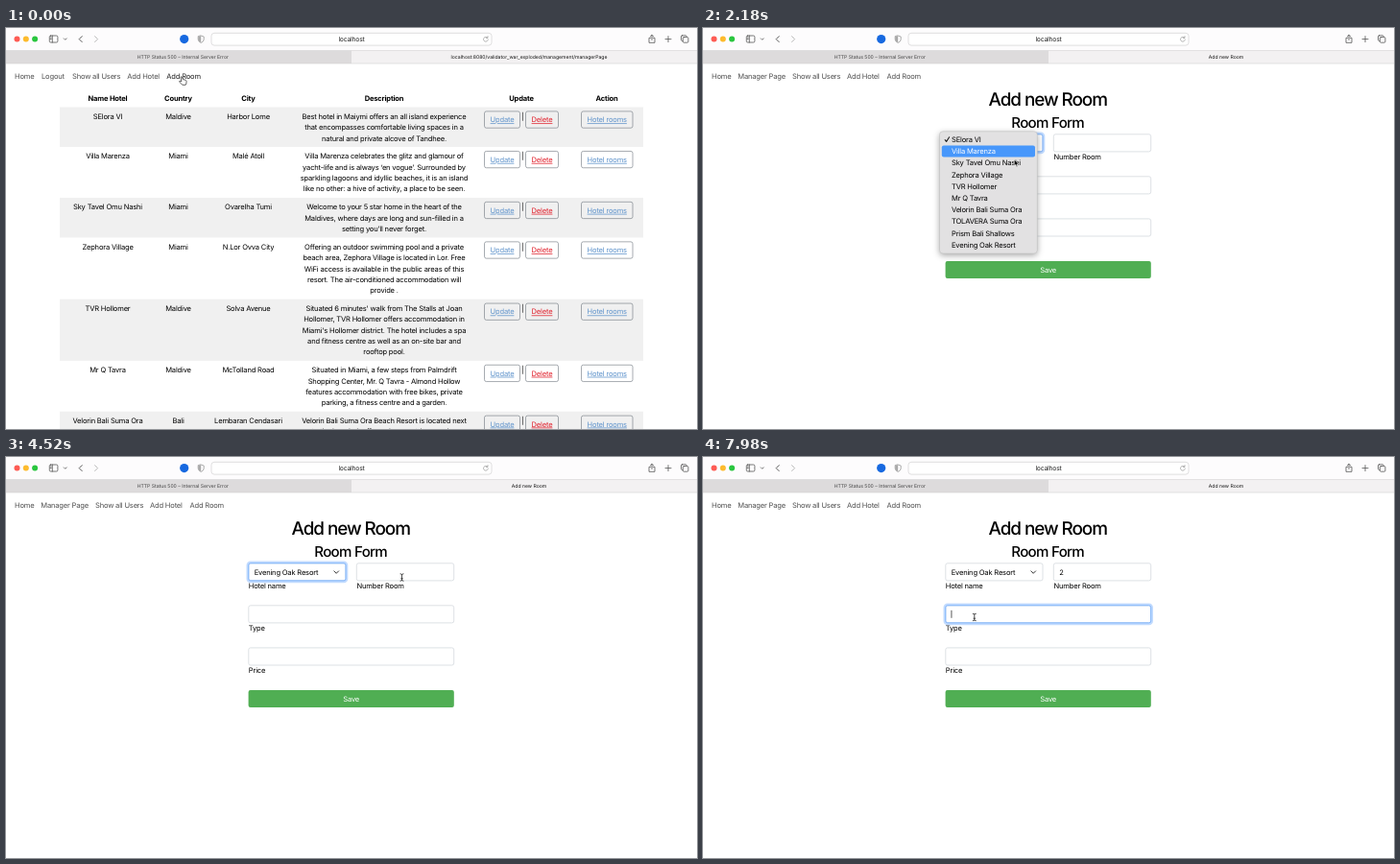
An HTML page for the animation above (8000 ms loop, 720x418 px).

```html
<!DOCTYPE html>
<html lang="en">
<head>
<meta charset="utf-8">
<title>Add new Room</title>
<style>
html, body { margin: 0; width: 100%; height: 100%; overflow: hidden; background: #fff; }
svg { display: block; width: 720px; height: 418px; }
text { font: 7.55px Inter, "Open Sans", sans-serif; letter-spacing: -.18px; fill: #000; text-rendering: geometricPrecision; white-space: pre; }
.mid { text-anchor: middle; }
.nav { fill: #505050; }
.hot { fill: #222; }
.addr { font-size: 6.8px; letter-spacing: -.2px; fill: #222; }
.tab { font-size: 5.1px; letter-spacing: 0; fill: #444; }
.url { fill: #111; }
.head { font-weight: 700; }
.h1 { font-size: 18.9px; font-weight: 500; letter-spacing: -1.05px; }
.h2 { font-size: 15.1px; font-weight: 500; letter-spacing: -.72px; }
.blue { fill: #5f93cb; text-decoration: underline; }
.red { fill: #e0202c; text-decoration: underline; }
.white { fill: #fff; }
.line { fill: none; stroke: #555; stroke-width: .8; stroke-linecap: round; stroke-linejoin: round; }
.btn { fill: none; stroke: #6c757d; stroke-width: .6; }
.field { fill: #fff; stroke: #ced4da; stroke-width: .7; }
.ring { fill: none; stroke: #c2dbfe; stroke-width: 2.6; }
.edge { fill: none; stroke: #79b0fb; stroke-width: .9; }
#menu { filter: drop-shadow(0 2px 3px #0005); }
</style>
</head>
<body>
<svg id="stage" viewBox="0 0 720 418"></svg>
<script>
const hotels = [
  ["SElora VI", "Maldive", "Harbor Lome", [
    "Best hotel in Maiymi offers an all island experience",
    "that encompasses comfortable living spaces in a",
    "natural and private alcove of Tandhee."]],
  ["Villa Marenza", "Miami", "Malé Atoll", [
    "Villa Marenza celebrates the glitz and glamour of",
    "yacht-life and is always ‘en vogue’. Surrounded by",
    "sparkling lagoons and idyllic beaches, it is an island",
    "like no other: a hive of activity, a place to be seen."]],
  ["Sky Tavel Omu Nashi", "Miami", "Ovarelha Tumi", [
    "Welcome to your 5 star home in the heart of the",
    "Maldives, where days are long and sun-filled in a",
    "setting you’ll never forget."]],
  ["Zephora Village", "Miami", "N.Lor Ovva City", [
    "Offering an outdoor swimming pool and a private",
    "beach area, Zephora Village is located in Lor. Free",
    "WiFi access is available in the public areas of this",
    "resort. The air-conditioned accommodation will",
    "provide ."]],
  ["TVR Hollomer", "Maldive", "Solva Avenue", [
    "Situated 6 minutes' walk from The Stalls at Joan",
    "Hollomer, TVR Hollomer offers accommodation in",
    "Miami's Hollomer district. The hotel includes a spa",
    "and fitness centre as well as an on-site bar and",
    "rooftop pool."]],
  ["Mr Q Tavra", "Maldive", "McTolland Road", [
    "Situated in Miami, a few steps from Palmdrift",
    "Shopping Center, Mr. Q Tavra - Almond Hollow",
    "features accommodation with free bikes, private",
    "parking, a fitness centre and a garden."]],
  ["Velorin Bali Suma Ora", "Bali", "Lembaran Cendasari", [
    "Velorin Bali Suma Ora Beach Resort is located next",
    "to the beach. It offers a large outdoor pool, a"]]
];
const names = [...hotels.map(h => h[0]), "TOLAVERA Suma Ora", "Prism Bali Shallows", "Evening Oak Resort"];

// y is the vertical middle of the lowercase line
const text = (x, y, s, cls = "") => `<text x="${x}" y="${y + 2.6}" class="${cls}">${s}</text>`;
const mid = (x, y, s, cls = "") => text(x, y, s, "mid " + cls);
const rect = (x, y, w, h, attrs) => `<rect x="${x}" y="${y}" width="${w}" height="${h}" ${attrs}/>`;
const dot = (x, y, r, fill) => `<circle cx="${x}" cy="${y}" r="${r}" fill="${fill}"/>`;
const line = (d, attrs = "") => `<path class="line" d="${d}" ${attrs}/>`;
const group = (id, body) => `<g id="${id}">${body}</g>`;
const nav = items => items.map(([x, s, cls]) => text(x, 50, s, "nav " + (cls || ""))).join("");

function chrome() {
  return rect(0, 0, 720, 24, 'fill="#fdfcfd"')
    + rect(0, 23.5, 360, 13.5, 'fill="#dddbdc"') + rect(360, 23.5, 360, 13.5, 'fill="#f3f1f2"')
    + rect(0, 23, 720, .6, 'fill="#d6d4d5"') + rect(0, 36.7, 720, .6, 'fill="#d2d0d1"')
    + dot(11.5, 11.6, 3, "#fe5b54") + dot(20.8, 11.6, 3, "#fdbb2d") + dot(30.1, 11.6, 3, "#2ac63f")
    + rect(45.3, 8, 8.6, 7, 'rx="1.3" class="line"') + line("M48.3 8V15M46.3 10H47.3M46.3 11.7H47.3")
    + line("M60.3 10.9L61.7 12.3L63.1 10.9")
    + line("M79.2 8.6L76.2 11.6L79.2 14.6", 'style="stroke:#333"')
    + line("M92.6 8.6L95.6 11.6L92.6 14.6", 'style="stroke:#aaa"')
    + dot(185.7, 11.6, 4.6, "#1769e0")
    + line("M203.2 8L206.2 9V12Q206 14.2 203.2 15.4Q200.4 14.2 200.2 12V9Z", 'style="stroke:#999"')
    + '<path d="M203.2 8V15.4Q200.4 14.2 200.2 12V9Z" fill="#aaa"/>'
    + rect(214, 5.3, 292, 12.8, 'rx="3" fill="#fff" stroke="#d9d7d8" stroke-width=".8"')
    + mid(360, 11.8, "localhost", "addr")
    + line("M501.8 10.3A2.4 2.4 0 1 0 502.3 12M500.3 10.3H502V8.6", 'style="stroke:#888;stroke-width:.6"')
    + line("M671.8 10.3H670V15.3H676V10.3H674.2M673 12.5V7.3M671.4 8.8L673 7.2L674.6 8.8")
    + line("M690 8.6V14.6M687 11.6H693")
    + rect(703.5, 7.8, 5.6, 5.6, 'rx="1" class="line"')
    + rect(705.3, 9.6, 5.6, 5.6, 'rx="1" class="line" style="fill:#fdfcfd"')
    + mid(184.3, 29.6, "HTTP Status 500 – Internal Server Error", "tab");
}

function listPage() {
  let out = mid(545, 29.6, "localhost:8080/validator_war_exploded/management/managerPage", "tab url")
    + nav([[9, "Home"], [69, "Show all Users"], [126.3, "Add Hotel"], [167.3, "Add Room", "hot"]])
    + text(37, 50.8, "Logout", "nav");
  [[106, "Name Hotel"], [179.5, "Country"], [252.5, "City"], [394, "Description"], [537, "Update"], [626, "Action"]]
    .forEach(([x, s]) => out += mid(x, 73, s, "head"));
  let top = 82.5;
  hotels.forEach(([name, country, city, lines], i) => {
    const h = lines.length * 11.33 + 7.55, y = top + 9.8;
    if (i % 2 == 0) out += rect(56, top, 608, h, 'fill="#f0f0f0"');
    out += mid(106, y, name) + mid(179.5, y, country) + mid(252.5, y, city) + mid(538.2, y, "|");
    lines.forEach((s, k) => out += mid(394, y + k * 11.33, s));
    [[498.5, 37, "Update", "blue"], [541.5, 34, "Delete", "red"], [599.5, 53.5, "Hotel rooms", "blue"]]
      .forEach(([x, w, s, cls]) => out += rect(x, top + 4.4, w, 17.3, 'rx="2" class="btn"')
        + mid(x + w / 2, top + 13.2, s, cls));
    top += h;
  });
  return out;
}

const boxes = { hotel: [252.8, 110.8, 101.2], room: [365.3, 110.8, 101.4], type: [252.8, 154.8, 213.9], price: [252.8, 198.9, 213.9] };
const box = (k, cls, pad = 0) => {
  const [x, y, w] = boxes[k];
  return rect(x - pad, y - pad, w + 2 * pad, 18.1 + 2 * pad, `rx="${2 + pad}" class="${cls}"`);
};

function formPage() {
  return mid(545, 29.6, "Add new Room", "tab url")
    + nav([[9, "Home"], [36.3, "Manager Page"], [93, "Show all Users"], [150, "Add Hotel"], [191.5, "Add Room"]])
    + mid(359.2, 78.7, "Add new Room", "h1") + mid(359.2, 101.1, "Room Form", "h2")
    + Object.keys(boxes).map(k => box(k, "field")).join("")
    + text(252.8, 134.5, "Hotel name") + text(365.5, 134.5, "Number Room")
    + text(252.8, 178.7, "Type") + text(252.8, 222.8, "Price")
    + rect(252.6, 243, 214.2, 18, 'rx="2" fill="#50ae53"') + mid(359.7, 252, "Save", "white")
    + Object.keys(boxes).map(k => group("focus-" + k, box(k, "ring", 1) + box(k, "edge"))).join("")
    + group("choice", text(258.7, 120, names[0])) + line("M341.8 118.9L344.2 121.3L346.6 118.9", 'style="stroke:#333;stroke-width:1"')
    + group("digit", text(371.3, 120, "2"))
    + rect(0, 0, .7, 8, 'id="caret" fill="#111"')
    + group("menu", rect(246.5, 107.8, 101.8, 127.2, 'rx="3.5" fill="#e2e1e2" stroke="#bbb" stroke-width=".5"')
      + rect(248.8, 0, 97.2, 12, 'rx="2" id="bar" fill="#4797fb"')
      + line("M252.2 116.6L253.6 118.4L256.6 113.8", 'style="stroke:#222;stroke-width:1.1"')
      + names.map((s, i) => text(259, itemY(i), s, "item")).join(""));
}
const itemY = i => 116.3 + 12.2 * i;

const pointers =
  group("hand", '<path d="M0 0Q1.2-.8 1.7.6L2.4 2.7Q5.6 2.6 6 4.4Q6.3 6.6 5.2 8.3H1.7Q.6 6.6-1.6 5Q-1.4 3.6.9 4.6Z" fill="#fff" stroke="#222" stroke-width=".7"/>')
  + group("arrow", '<path d="M0 0V6.7L1.5 5.3L2.5 7.7L3.7 7.2L2.7 4.9H4.8Z" fill="#000" stroke="#fff" stroke-width=".6"/>')
  + group("beam", line("M-1.5-3.7Q0-3.7 0-2.8Q0-3.7 1.5-3.7M0-2.8V2.8M-1.5 3.7Q0 3.7 0 2.8Q0 3.7 1.5 3.7M-.8 1.2H.8", 'style="stroke:#222"'));

document.getElementById("stage").innerHTML =
  chrome() + group("list", listPage()) + group("form", formPage()) + pointers;

const $ = id => document.getElementById(id);
const show = (id, on) => $(id).style.display = on ? "" : "none";
const items = document.querySelectorAll(".item");

// time, x, y of the pointer's hot spot
const path = [
  [0, 182, 51], [440, 182, 51], [1100, 265, 123.8], [1600, 265, 123.8], [2060, 317, 132], [2180, 324.3, 137],
  [2880, 268.3, 228], [3850, 268.3, 228], [4400, 412.5, 125.5], [4900, 412.5, 125.5], [5200, 409, 125.5],
  [7050, 409, 125.5], [7700, 282.8, 167], [8000, 282.8, 167]
];
function pointerAt(t) {
  const i = path.findIndex(p => p[0] > t), [t0, x0, y0] = path[i - 1], [t1, x1, y1] = path[i];
  const u = (t - t0) / (t1 - t0), e = u * u * (3 - 2 * u);
  return [x0 + (x1 - x0) * e, y0 + (y1 - y0) * e];
}

const LOAD = 440, OPEN = 1400, PICK = 3800, ROOM = 4800, TYPED = 6300, TYPE = 7840;

function draw(t) {
  const [x, y] = pointerAt(t);
  show("list", t < LOAD);
  show("form", t >= LOAD);

  const focus = t < OPEN ? "" : t < ROOM ? "hotel" : t < TYPE ? "room" : "type";
  for (const k in boxes) show("focus-" + k, k == focus);
  $("choice").firstChild.textContent = names[t < PICK ? 0 : 9];
  show("digit", t >= TYPED);

  const open = t >= OPEN && t < PICK;
  show("menu", open);
  if (open) {
    // the highlight trails the pointer
    const row = Math.max(0, Math.min(9, Math.round((pointerAt(t - 120)[1] - itemY(0)) / 12.2)));
    $("bar").setAttribute("y", itemY(row) - 6);
    items.forEach((el, i) => el.style.fill = i == row ? "#fff" : "");
  }

  const since = t - (t < TYPED ? ROOM : t < TYPE ? TYPED : TYPE);
  show("caret", t >= ROOM && since % 1000 < 600);
  $("caret").setAttribute("x", t < TYPED ? 371.3 : t < TYPE ? 375.8 : 258.6);
  $("caret").setAttribute("y", t < TYPE ? 115.8 : 159.8);

  const kind = t < LOAD ? "hand" : t < 4200 ? "arrow" : t < TYPED || t >= 7050 ? "beam" : "";
  for (const k of ["hand", "arrow", "beam"]) {
    show(k, k == kind);
    $(k).setAttribute("transform", `translate(${x} ${y})`);
  }
}

const start = performance.now();
function tick() {
  draw((performance.now() - start) % 8000);
  requestAnimationFrame(tick);
}
tick();
</script>
</body>
</html>
```
